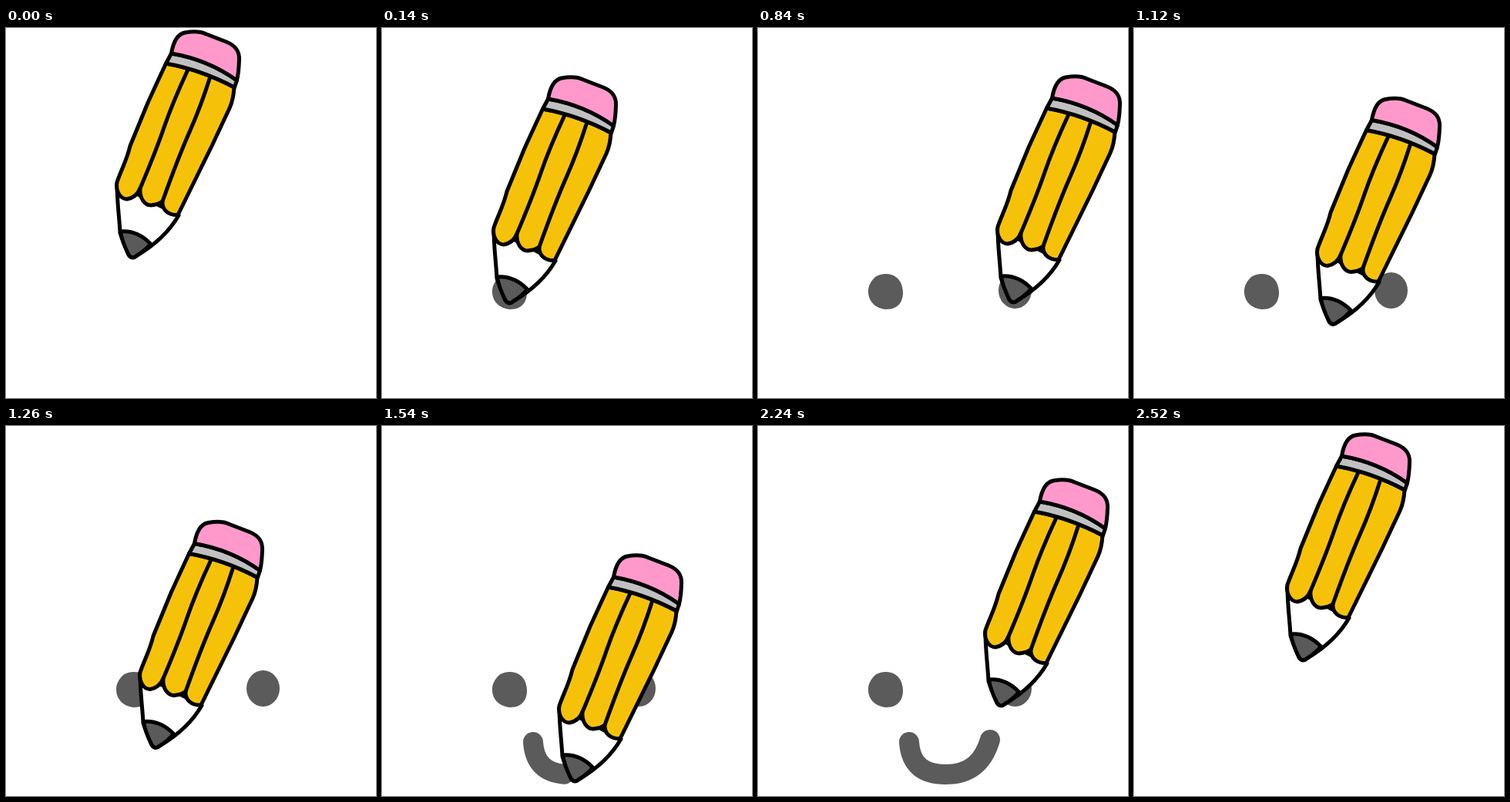
Recreate the animation shown at these times as an HTML page. Size 480x480 px, loop 2.66 s.

```html
<!DOCTYPE html>
<html lang="en">
<head>
<meta charset="utf-8">
<title>Pencil drawing a smile</title>
<style>
  html, body { margin: 0; height: 100%; overflow: hidden; background: #fff; }
  svg { display: block; width: 100vw; height: 100vh; }
  .ink { fill: #5b5b5b; }
  #smile { fill: none; stroke: #5b5b5b; stroke-width: 26; stroke-linecap: round; }
  #pencil { stroke: #000; stroke-width: 5; stroke-linejoin: round; stroke-linecap: round; }
</style>
</head>
<body>
<svg viewBox="0 0 480 480">
  <path id="leftEye" class="ink" d="M143 342C143 334 147 328 152 323C158 319 166 318 173 320C182 323 186 330 187 336C189 343 188 349 186 354C182 362 175 365 166 365C153 364 143 355 143 342Z"/>
  <ellipse id="rightEye" class="ink" cx="333.5" cy="340.5" rx="21.5" ry="23.5"/>
  <path id="smile" pathLength="100" d="M196 410C198 440 215 452 243 452C277 452 293 434 301 407"/>
  <g id="pencil">
    <path fill="#fff" d="M144 202C144 226 147 245 148 266C152 278 156 287 159 294Q163 301 170 295C192 282 212 264 224 243Z"/>
    <path fill="#5a5a5a" d="M148.500 264Q170 262 187.500 280Q180 289 170 295Q163 301 159 294C155 286 150 275 148.500 264Z"/>
    <path fill="#f6c209" d="M207.500 46Q194 75 184 97L161 153C157 171 149 185 144 200C142 211 148 222 157 222Q169 220 174 208C173 221 180 230 188 230Q198 229 203 225C202 236 211 243 223 242.500L267 153L290 104Q295 93 296 77Q253 54 207.500 46Z"/>
    <path fill="none" d="M236 54Q216 97 205 129T174 208M264 66Q253 101 238 135T203 225"/>
    <path fill="#c0c0c0" d="M214.500 33L207.500 46Q253 54 296.500 77L299.500 68Q262 41 214.500 33Z"/>
    <path fill="#ff99cc" d="M214.500 33C217 18 222 8 232 6C243 4 252 4 260 8L286 18C298 23 303 30 302.500 41Q302 58 299.500 68Q262 41 214.500 33Z"/>
  </g>
</svg>
<script>
  const STEP = 140, LOOP = 2660;
  const [leftEye, rightEye, smile, pencil] =
    ["leftEye", "rightEye", "smile", "pencil"].map(id => document.getElementById(id));

  // Each pose: steps held, pencil offset x, y, percent of the smile drawn
  const poses = [
    [1, 0, 0, 0], [3, 1, 59, 0], [1, 60, 35, 0], [1, 120, 35, 0],
    [2, 167, 58, 0], [1, 94, 86.5, 0], [1, 30, 119.5, 0],
    [1, 54, 159, 22], [1, 86, 163, 43], [1, 118, 150, 67],
    [3, 139, 109, 100], [1, 151, 65, 100], [1, 112.5, 28, 100], [1, 55, 6, 0]
  ];
  const timeline = poses.flatMap(([hold, ...pose]) => Array(hold).fill(pose));
  const show = (part, on) => part.setAttribute("visibility", on ? "visible" : "hidden");

  function draw(now) {
    const step = Math.floor(now % LOOP / STEP);
    const [x, y, drawn] = timeline[step];
    pencil.setAttribute("transform", `translate(${x} ${y})`);
    show(leftEye, step >= 1 && step < 18);
    show(rightEye, step >= 6 && step < 18);
    show(smile, drawn);
    smile.setAttribute("stroke-dasharray", drawn < 100 ? `${drawn} 200` : "none");
    requestAnimationFrame(() => draw(performance.now() - start));
  }
  const start = performance.now();
  draw(0);
</script>
</body>
</html>
```
